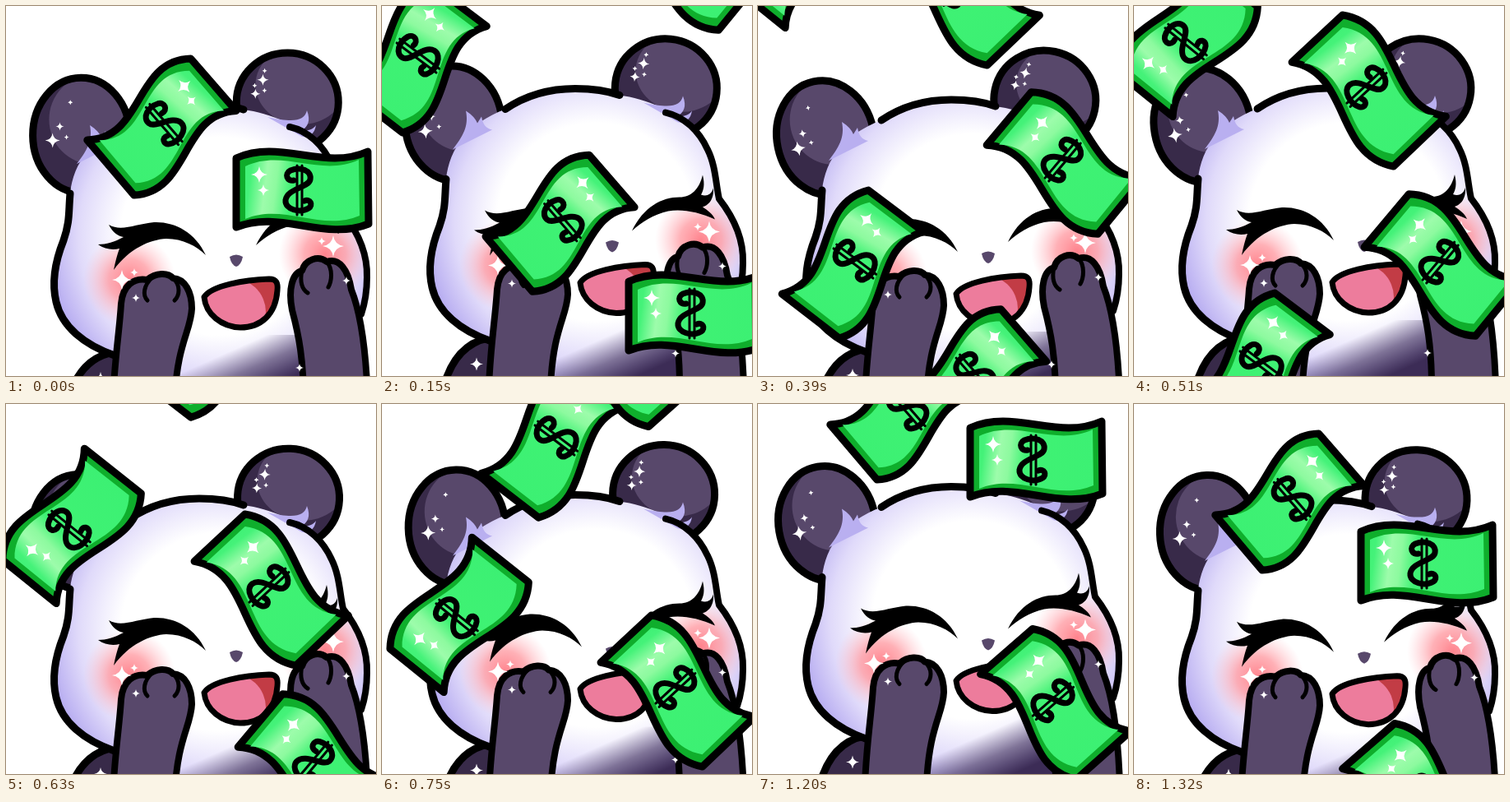
Animation, 450 px wide and 450 px high, one loop 1.35 s. Source, as an HTML page with a canvas:

```html
<!DOCTYPE html>
<html lang="en">
<head>
<meta charset="utf-8">
<title>Happy panda</title>
<style>
html, body { margin: 0; width: 100%; height: 100%; overflow: hidden; background: #fff; }
canvas { display: block; width: 450px; height: 450px; }
</style>
</head>
<body>
<canvas id="stage" width="450" height="450"></canvas>
<script>
const ctx = document.getElementById('stage').getContext('2d');
const LOOP = 1350, STEP = 30, BOUNCE = LOOP / 4, SWAY = LOOP / 2, TAU = Math.PI * 2;
const FUR = '#58486b', FUR_DARK = '#382a49', LILAC = '#b9aff0';

const HEAD_LEFT = 'M78 228C76 250 78 262 70 285C60 310 55 335 61 360C68 390 95 412 132 425';
const HEAD_TOP = 'M150 143C175 126 205 118 235 118C262 118 278 122 289 126';
const HEAD_RIGHT = 'M345 147C368 152 386 170 396 192C406 212 406 235 410 252C428 275 440 300 439 330C439 345 437 360 432 375';
const HEAD = 'M78 228C82 190 105 160 150 143C175 126 205 118 235 118C262 118 278 122 289 126' +
  'C320 130 360 145 388 176C406 212 406 235 410 252C428 275 440 300 439 330C439 345 437 360 432 375' +
  'L430 480H130L132 425C95 412 68 390 61 360C55 335 60 310 70 285C78 262 76 250 78 228Z';
const TUFTS = 'M86 192C102 172 105 160 102 145C110 150 114 155 116 160L121 152C123 162 126 166 134 168Z' +
  'M318 135C350 142 363 140 366 127C371 140 367 147 359 152C370 152 374 149 377 145C375 156 369 160 360 159Z';
const EYES = 'M243 303C230 275 205 262 180 263C158 265 140 275 125 266C130 276 137 280 143 281C132 287 122 290 112 290' +
  'C120 296 130 297 138 295C135 303 133 311 131 321C150 295 175 284 195 283C215 283 232 292 243 303Z' +
  'M304 291C318 262 340 250 362 250C376 250 386 240 390 223C393 235 391 242 388 247C394 249 400 248 403 239' +
  'C404 254 396 260 390 262C396 266 402 270 405 277C385 268 365 264 348 267C330 271 316 280 304 291Z';
const NOSE = 'M272 305Q280 300 288 305Q286 315 280 317Q274 315 272 305Z';
const MOUTH = 'M241 354C250 340 290 333 320 332C329 332 331 337 330 346C328 375 310 391 285 391C262 390 243 375 241 354Z';
const SHOULDER = 'M75 480C85 445 105 422 140 420V480Z';
const PAW_L = 'M130 480C132 430 138 395 140 362C142 340 155 330 172 333C182 324 197 324 203 331C218 332 226 348 226 368C225 395 208 410 205 480';
const PAW_R = 'M362 480C362 430 356 400 348 370C343 345 348 325 360 322C364 308 380 303 390 311C405 306 416 320 420 345C432 375 438 420 440 480';
const TOES = 'M178 330C167 340 166 352 172 358M203 331C213 340 211 352 205 358' +
  'M360 322C357 335 360 345 367 349M390 311C398 320 396 335 392 342';
const DOLLAR = 'M-6-12C-14-10-18-20-10-24C2-29 16-24 14-13C12-3-14-2-16 12C-17 24 2 28 12 22C18 18 14 10 7 13';

// tilt in degrees, flip, half length, wave, visible until, then [time, x, y] keys
const BILLS = [
  { tilt: -53, flip: 1, len: 82, wave: 40, end: 700, keys: [[270, 79, 188], [510, 153, 438]] },
  { tilt: 40, len: 86, wave: 42, end: 760, keys: [[270, 371, 66], [510, 375, 314]] },
  { tilt: -51, len: 84, wave: 40, end: 1150, keys: [[510, 65, 41], [750, 93, 257], [990, 162, 471]] },
  { tilt: 47, len: 88, wave: 42, end: 990, keys: [[510, 285, 102], [750, 359, 348]] },
  { tilt: -53, flip: 1, len: 86, wave: 42, end: 1190, keys: [[750, 210, 44], [990, 141, 288]] },
  { tilt: 49, len: 86, wave: 42, end: 1350, keys: [[750, 298, -65], [990, 293, 166], [1200, 361, 364], [1320, 344, 479]] },
  { tilt: -41, flip: 1, len: 80, wave: 40, end: 1840, keys: [[1200, 179, 8], [1320, 190, 118], [1350, 190, 146], [1620, 239, 357]] },
  { tilt: 0, len: 80, wave: 20, end: 1700, keys: [[1200, 338, 68], [1320, 356, 194], [1350, 360, 224]] }
];

function paint(d, fill, width) {
  const path = typeof d === 'string' ? new Path2D(d) : d;
  if (fill) { ctx.fillStyle = fill; ctx.fill(path); }
  if (width) { ctx.lineWidth = width; ctx.strokeStyle = '#000'; ctx.stroke(path); }
}

function ellipse(x, y, rx, ry) {
  const p = new Path2D();
  p.ellipse(x, y, rx, ry, 0, 0, TAU);
  return p;
}

function within(path, draw) {
  ctx.save();
  ctx.clip(path);
  draw();
  ctx.restore();
}

function radial(x, y, r, stops) {
  const g = ctx.createRadialGradient(x, y, 0, x, y, r);
  stops.forEach(([at, c]) => g.addColorStop(at, c));
  return g;
}

function linear(x0, y0, x1, y1, stops) {
  const g = ctx.createLinearGradient(x0, y0, x1, y1);
  stops.forEach(([at, c]) => g.addColorStop(at, c));
  return g;
}

function star(x, y, r) {
  const p = new Path2D(), q = r * 0.12;
  p.moveTo(x, y - r);
  [[1, -1, 1, 0], [1, 1, 0, 1], [-1, 1, -1, 0], [-1, -1, 0, -1]].forEach(([a, b, c, d]) =>
    p.quadraticCurveTo(x + a * q, y + b * q, x + c * r, y + d * r));
  paint(p, '#fff');
}

function ear(x, y, rx, ry, light, pivot, angle, stars) {
  ctx.save();
  ctx.translate(...pivot);
  ctx.rotate(angle);
  ctx.translate(-pivot[0], -pivot[1]);
  const shape = ellipse(x, y, rx, ry);
  paint(shape, FUR_DARK);
  within(shape, () => paint(ellipse(...light), FUR));
  paint(shape, null, 9);
  stars.forEach(s => star(...s));
  ctx.restore();
}

function blush(x, y, r) {
  paint(ellipse(x, y, r, r), radial(x, y, r,
    [[0, 'rgba(255,125,135,.95)'], [0.45, 'rgba(255,150,158,.75)'], [1, 'rgba(255,190,200,0)']]));
}

function panda(t) {
  const lift = 9 * (Math.cos(TAU * t / BOUNCE) - 1);
  const out = 0.5 - 0.5 * Math.cos(TAU * (t - 30) / SWAY);
  const lean = 0.21 * (1 - (1 - out) ** 2);
  ctx.save();
  ctx.translate(0, lift);

  paint(SHOULDER, FUR_DARK, 9);
  ear(92, 157, 59, 70, [105, 138, 52, 54], [122, 208], -lean,
    [[57, 163, 9], [66, 146, 5], [79, 117, 3], [74, 159, 3]]);
  ear(342, 117, 62, 60, [358, 96, 55, 48], [340, 150], lean,
    [[312, 90, 7], [303, 107, 6], [314, 79, 3], [302, 97, 3], [314, 103, 3]]);

  const head = new Path2D(HEAD);
  paint(head, radial(260, 280, 215, [[0, '#fff'], [0.56, '#fff'], [0.8, '#e0dafa'], [1, '#b4a9f0']]));
  paint(TUFTS, LILAC);
  within(head, () => {
    blush(150, 333, 56);
    blush(388, 302, 56);
    ctx.fillStyle = linear(290, 412, 314, 466, [[0, 'rgba(60,44,86,0)'], [0.5, 'rgba(60,44,86,.6)'], [1, '#3c2c56']]);
    ctx.fillRect(205, 400, 160, 80);
  });
  paint(HEAD_LEFT, null, 9);
  paint(HEAD_TOP, null, 9);
  paint(HEAD_RIGHT, null, 8);

  paint(EYES, '#000');
  paint(NOSE, FUR);
  const mouth = new Path2D(MOUTH);
  paint(mouth, '#c23c45');
  within(mouth, () => paint(ellipse(272, 372, 44, 42), '#ed7c9c'));
  paint(mouth, null, 7);

  paint(PAW_L, FUR, 8);
  paint(PAW_R, FUR, 8);
  paint(TOES, null, 5);
  [[141, 333, 12], [156, 324, 5], [158, 355, 5], [398, 292, 13], [384, 286, 5], [414, 334, 5],
    [115, 453, 8], [357, 440, 5]].forEach(s => star(...s));
  ctx.restore();
}

function sheet(len, half, wave) {
  const p = new Path2D(), c = len / 3;
  p.moveTo(-len, 4 - half);
  p.bezierCurveTo(-c, -half - wave, c, wave - half, len, -half - 4);
  p.lineTo(len + 1, half - 2);
  p.bezierCurveTo(c, half + wave, -c, half - wave, -len, half + 2);
  p.closePath();
  return p;
}

function place(keys, t) {
  let i = 0;
  while (i < keys.length - 2 && t > keys[i + 1][0]) i++;
  const [a, b] = [keys[i], keys[i + 1]];
  const k = (t - a[0]) / (b[0] - a[0]);
  return [a[1] + (b[1] - a[1]) * k, a[2] + (b[2] - a[2]) * k];
}

function bill({ tilt, flip, len, wave, end, keys }, t) {
  if (t >= end) return;
  const [x, y] = place(keys, t);
  if (y < -130 || y > 580) return;
  ctx.save();
  ctx.translate(x, y);
  ctx.rotate(tilt * Math.PI / 180);
  if (flip) ctx.scale(-1, 1);
  const outer = sheet(len, 43, wave);
  paint(outer, '#0fae2c', 9);
  paint(sheet(len - 11, 33, wave * 0.9), linear(-len, -10, len, 10,
    [[0, '#3cf073'], [0.1, '#45f279'], [0.22, '#9dfcab'], [0.3, '#8dfa9f'], [0.42, '#3ff274'], [1, '#3cf073']]));
  star(-52, -19, 10);
  star(-47, 0, 7);
  ctx.translate(-4, 0);
  paint(DOLLAR, null, 7);
  paint('M-2-30V30M4-30V30', null, 3);
  ctx.restore();
}

function draw(t) {
  ctx.fillStyle = '#fff';
  ctx.fillRect(0, 0, 450, 450);
  ctx.lineCap = ctx.lineJoin = 'round';
  panda(t);
  BILLS.forEach(b => {
    bill(b, t);
    if (b.end > LOOP) bill(b, t + LOOP);
  });
}

const start = performance.now();
function tick() {
  const t = (performance.now() - start) % LOOP;
  draw(Math.floor(t / STEP) * STEP);
  requestAnimationFrame(tick);
}
tick();
</script>
</body>
</html>
```
